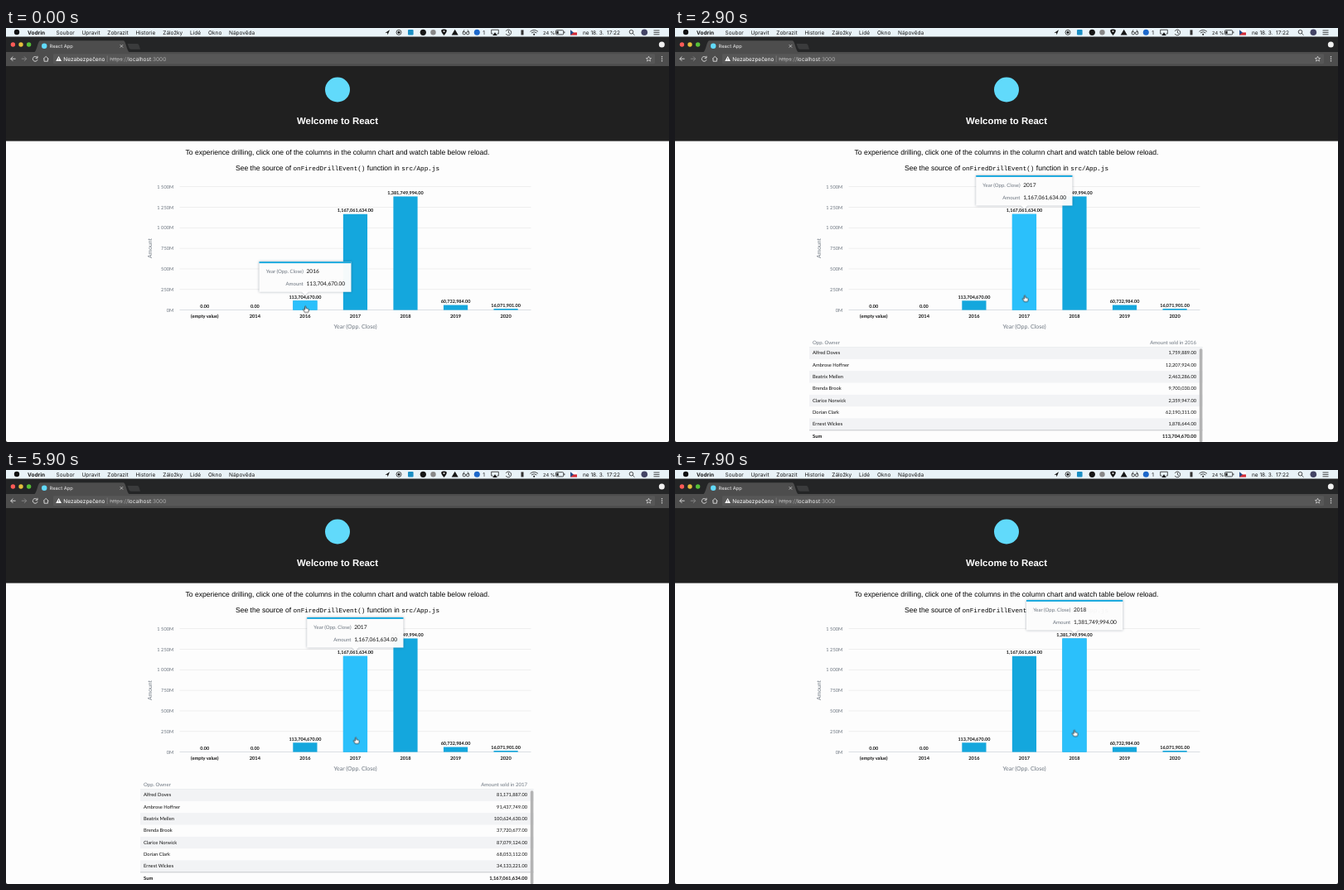
An HTML page for the animation above (8000 ms loop, 800 by 500 pixels).

```html
<!DOCTYPE html>
<html lang="cs">
<head>
<meta charset="utf-8">
<title>React App</title>
<style>
  html, body { margin: 0; width: 100%; height: 100%; overflow: hidden; background: #fdfdfd; }
  svg { display: block; width: 800px; height: 500px; text-rendering: geometricPrecision; }
  text { white-space: pre; }
  .ui { font-family: Inter, sans-serif; font-size: 6.5px; fill: #161616; }
  .page { font-family: "Liberation Sans", Arial, sans-serif; font-size: 8.57px; fill: #000; }
  .code { font-family: "Liberation Mono", "Courier New", monospace; font-size: 7.63px; }
  .chart { font-family: Lato, sans-serif; font-size: 5.7px; fill: #111; }
  .soft { fill: #6d7680; }
  .bold { font-weight: 700; }
  .mid { text-anchor: middle; }
  .end { text-anchor: end; }
  .line { fill: none; stroke: #222; stroke-width: .8; }
  .bar { fill: #14a7dd; }
  .hot { fill: #2bc0fb; }
  .tip { filter: drop-shadow(0 .7px 1.4px rgba(20, 40, 60, .38)); }

  /* 1.25% of the loop is 100 ms */
  .timed { visibility: hidden; animation: 8s step-end infinite; }
  #hot2 { animation-name: hot2; }
  #hot3 { animation-name: hot3; }
  #hot4 { animation-name: hot4; }
  #tip2 { animation-name: tip2; }
  #tip3 { animation-name: tip3; }
  #tip4 { animation-name: tip4; }
  #table2016 { animation-name: table2016; }
  #table2017 { animation-name: table2017; }
  #hand { animation-name: hand; }
  #arrow { animation-name: arrow; }
  #cursor { animation: move 8s step-end infinite; }

  @keyframes hot2 { 0% { visibility: visible } 23.75%, 100% { visibility: hidden } }
  @keyframes hot3 { 0% { visibility: hidden } 26.25% { visibility: visible } 80%, 100% { visibility: hidden } }
  @keyframes hot4 { 0% { visibility: hidden } 82.5%, 100% { visibility: visible } }
  @keyframes tip2 { 0% { visibility: visible } 27.5%, 100% { visibility: hidden } }
  @keyframes tip3 { 0% { visibility: hidden } 27.5% { visibility: visible } 83.75%, 100% { visibility: hidden } }
  @keyframes tip4 { 0% { visibility: hidden } 83.75%, 100% { visibility: visible } }
  @keyframes table2016 { 0% { visibility: hidden } 17.5% { visibility: visible } 41.25%, 100% { visibility: hidden } }
  @keyframes table2017 { 0% { visibility: hidden } 66.25% { visibility: visible } 95%, 100% { visibility: hidden } }
  @keyframes hand {
    0% { visibility: visible } 23.75% { visibility: hidden } 26.25% { visibility: visible }
    80% { visibility: hidden } 81.25%, 100% { visibility: visible }
  }
  @keyframes arrow {
    0% { visibility: hidden } 23.75% { visibility: visible } 26.25% { visibility: hidden }
    80% { visibility: visible } 81.25%, 100% { visibility: hidden }
  }
  @keyframes move {
    0% { transform: translate(362px, 339.5px) }
    21.25% { transform: translate(365px, 339px) }
    22.5% { transform: translate(374px, 338.5px) }
    23.75% { transform: translate(385.5px, 338px) }
    25% { transform: translate(402px, 334px) }
    26.25% { transform: translate(415px, 329px) }
    27.5% { transform: translate(422.7px, 326.5px) }
    78.75% { transform: translate(427px, 326px) }
    80% { transform: translate(447px, 325px) }
    81.25% { transform: translate(468.6px, 323.3px) }
    82.5% { transform: translate(477px, 320px) }
    83.75%, 100% { transform: translate(482.6px, 317.6px) }
  }
</style>
</head>
<body>
<svg viewBox="0 0 800 500">
  <rect width="800" height="500" fill="#fdfdfd"/>

  <g id="menu" class="ui">
    <rect width="800" height="10.7" fill="#e9f3f8"/>
    <circle cx="13" cy="5" r="3.2" fill="#111"/>
    <path d="M457.5 6 463 2.3 460.6 8.2 460 5.8Z"/>
    <circle class="line" cx="474" cy="5.3" r="3"/><circle cx="474" cy="5.3" r="1.5"/>
    <rect x="485" y="2" width="6.6" height="6.6" rx="1" fill="#1b8fc4"/>
    <circle cx="503.3" cy="5.3" r="3.6"/>
    <circle cx="515.5" cy="5.3" r="3.2" fill="#888"/>
    <path d="M528.5 9C522.5 2 526 1.5 528.5 1.5S534.5 2 528.5 9Z"/><circle cx="528.5" cy="4" r="1" fill="#eee"/>
    <path d="M541.7 1.8 545.7 8.6H537.7Z"/>
    <g class="line"><circle cx="552.8" cy="6.2" r="1.7"/><circle cx="557.2" cy="6.2" r="1.7"/><path d="M551.3 5 553 2.3M558.7 5 557 2.3"/></g>
    <circle cx="568.3" cy="5.3" r="3.5" fill="#1c68cb"/>
    <path class="line" d="M587.5 7H585.7V2.2H594.3V7H592.5"/><path d="M590 5.3 592.8 9H587.2Z"/>
    <path class="line" d="M603.2 3.8A3.4 3.4 0 1 1 603.2 7M606.4 3.3V5.7L608 6.6"/>
    <rect x="621.5" y="2.4" width="3" height="6" fill="#333"/>
    <g class="line" stroke-linecap="round"><path d="M632.8 4.1Q637.2 .5 641.6 4.1M634.3 5.7Q637.2 3.4 640.1 5.7"/></g><circle cx="637.2" cy="7.8" r="1"/>
    <rect class="line" x="663.4" y="2.7" width="9.3" height="5.2" rx="1"/><rect x="664.4" y="3.7" width="2.2" height="3.2"/><rect x="673.4" y="4.4" width=".9" height="1.8"/>
    <rect x="681" y="2.2" width="8" height="3.2" fill="#fff"/><rect x="681" y="5.4" width="8" height="3.2" fill="#d52b35"/><path d="M681 2.2 685 5.4 681 8.6Z" fill="#254b87"/>
    <circle class="line" cx="754.5" cy="4.7" r="2.3"/><path class="line" d="M756.2 6.4 758.5 8.7"/>
    <circle cx="770.3" cy="5.3" r="3.8" fill="#434465"/>
    <path class="line" d="M781.5 3H788.5M781.5 5.4H788.5M781.5 7.8H788.5"/>
  </g>

  <g id="browser">
    <rect y="10.5" width="800" height="18.7" fill="#242526"/>
    <circle cx="8.4" cy="20" r="2.7" fill="#fc5b57"/>
    <circle cx="18" cy="20" r="2.7" fill="#e5bf3c"/>
    <circle cx="27.6" cy="20" r="2.7" fill="#57c038"/>
    <path d="M34 29.2C37 28.5 38 17 41 15.2H142C145 17 146 28.5 149 29.2Z" fill="#4d4d4d"/>
    <path d="M146.5 19H158.5Q160 19 160.6 21L162 25.8H151Q149 25.8 148.4 24Z" fill="#3a3b3c"/>
    <circle cx="46.2" cy="21.8" r="3.2" fill="#61dafb"/>
    <path d="M137.7 20.2 141.1 23.6M141.1 20.2 137.7 23.6" stroke="#ccc" stroke-width=".8"/>
    <circle cx="791.3" cy="20" r="3.5" fill="#f0f0f0"/>
    <rect y="29" width="800" height="17.2" fill="#4d4d4d"/>
    <rect x="57" y="31.3" width="726" height="12" rx="1.2" fill="#575757"/>
    <g fill="none" stroke="#dedede" stroke-width=".9">
      <path d="M11.6 37.2H5.8M8.4 34.5 5.7 37.2 8.4 39.9"/>
      <path d="M18.8 37.2H24.6M22 34.5 24.7 37.2 22 39.9" stroke="#8b8b8b"/>
      <path d="M37.6 35.7A2.9 2.9 0 1 0 38 38.2M38 33.8V36.3H35.5"/>
      <path d="M45 37.4 48.2 34.4 51.4 37.4M46 37V40.2H50.4V37"/>
    </g>
    <path d="M63.6 34 67 40H60.2Z" fill="#fff"/><path d="M63.6 36V38M63.6 38.5V39.2" stroke="#555" stroke-width=".7"/>
    <path d="M775.5 34.2 776.4 36.3 778.6 36.5 776.9 37.9 777.5 40.1 775.5 38.9 773.5 40.1 774.1 37.9 772.4 36.5 774.6 36.3Z" fill="none" stroke="#ddd" stroke-width=".7"/>
    <g fill="#ddd"><circle cx="791.5" cy="34.8" r=".8"/><circle cx="791.5" cy="37.3" r=".8"/><circle cx="791.5" cy="39.8" r=".8"/></g>
    <g class="ui">
      <text x="52.5" y="24.1" fill="#eee" style="font-size:5.8px">React App</text>
      <text x="69.3" y="39.7" fill="#fff">Nezabezpečeno</text>
      <path d="M122.2 33.5V41" stroke="#888" stroke-width=".6"/>
      <text x="125.2" y="39.7" fill="#aaa"><tspan text-decoration="line-through">https</tspan>://<tspan fill="#eee">localhost</tspan>:3000</text>
    </g>
  </g>

  <g class="page mid">
    <rect y="46" width="800" height="90.6" fill="#202020"/>
    <circle cx="400" cy="74.5" r="15" fill="#61dafb"/>
    <text class="bold" x="400" y="115.8" fill="#fff" style="font-size:11.4px">Welcome to React</text>
    <text x="400" y="153.2">To experience drilling, click one of the columns in the column chart and watch table below reload.</text>
    <text x="400" y="172">See the source of <tspan class="code">onFiredDrillEvent()</tspan> function in <tspan class="code">src/App.js</tspan></text>
  </g>

  <g id="chart" class="chart"></g>
  <g id="tables" class="chart"></g>
  <g id="tips" class="chart"></g>

  <g id="cursor">
    <path id="hand" class="timed" fill="#fff" stroke="#111" stroke-width=".65" stroke-linejoin="round"
      d="M-1.4 4 -3.4 .8Q-3.6-.4-2.4 0L-1.4 1V-3.2Q-.8-4.2-.1-3.2V-.8Q.7-1.3 1.2-.5 2-.9 2.4-.1 3.3-.3 3.4.6V2.2L2.6 4Z"/>
    <path id="arrow" class="timed" stroke="#fff" stroke-width=".5"
      d="M-1.2-3.8V3.1L.3 1.7 1.3 4 2.5 3.5 1.5 1.3H3.6Z"/>
  </g>
  <path d="M0 498Q0 500 2 500H0ZM800 498Q800 500 798 500H800Z" fill="#222"/>
</svg>
<script>
  const years = ['(empty value)', '2014', '2016', '2017', '2018', '2019', '2020'];
  const amounts = [0, 0, 113704670, 1167061634, 1381749994, 60732984, 16071901];
  const owners = ['Alfred Doves', 'Ambrose Hoffner', 'Beatrix Mellen', 'Brenda Brook',
    'Clarice Norwick', 'Dorian Clark', 'Ernest Wickes'];
  const sales = {
    2016: [1759889, 12207924, 2463286, 9700030, 2359947, 62190311, 1878644],
    2017: [81171887, 91437749, 100624630, 37720677, 87079124, 68053112, 34133221]
  };
  const base = 340.6, unit = 148.9 / 1.5e9;

  const put = (id, markup) => document.getElementById(id).insertAdjacentHTML('beforeend', markup);
  const money = n => n.toLocaleString('en-US', { minimumFractionDigits: 2 });
  const text = (x, y, s, cls = '', size = 5.7) =>
    `<text x="${x}" y="${y}" class="${cls}" style="font-size:${size}px">${s}</text>`;
  const rect = (x, y, w, h, extra) => `<rect x="${x}" y="${y}" width="${w}" height="${h}" ${extra}/>`;
  const center = i => 239.8 + 60.55 * i;

  [[26, 'Vodrin', 'bold'], [60.5, 'Soubor'], [91.5, 'Upravit'], [122.3, 'Zobrazit'], [156.5, 'Historie'],
    [189.3, 'Záložky'], [222, 'Lidé'], [244, 'Okno'], [269, 'Nápověda'], [575.3, '1'],
    [696, 'ne 18. 3.  17:22']].forEach(([x, s, cls]) => put('menu', text(x, 7.6, s, cls, 6.5)));
  put('menu', text(648, 7.5, '24 %', '', 5.7));

  for (let i = 0; i <= 6; i++) {
    const y = base - i * 24.82;
    const label = (i * 250).toString().replace(/^1(?=\d{3})/, '1 ') + 'M';
    put('chart', rect(209.5, y - .4, 424, .8, `fill="${i ? '#ebebeb' : '#d3d8de'}"`) +
      text(202.3, y + 2, label, 'end soft'));
  }
  years.forEach((year, i) => {
    const x = center(i), h = amounts[i] * unit, top = base - h;
    const box = extra => rect(x - 14.6, top, 29.2, h, extra);
    put('chart', box('class="bar"') +
      (i > 1 && i < 5 ? box(`id="hot${i}" class="hot timed"`) : '') +
      text(x, top - 2.3, money(amounts[i]), 'mid bold', 5.5) +
      text(x, 349.6, year, 'mid bold', 5.7));
  });
  put('chart', text(421.5, 362.6, 'Year (Opp. Close)', 'mid soft', 7) +
    `<g transform="translate(176 266) rotate(-90)">${text(0, 0, 'Amount', 'mid soft', 6.8)}</g>`);

  [[2, 305.5, 282.2, 111], [3, 363.2, 178, 116.3], [4, 424, 157, 116.3]].forEach(([i, x, y, w]) => {
    const mid = center(i), foot = y + 36.6;
    put('tips', `<g id="tip${i}" class="tip timed">
      <path d="M${x} ${y}H${x + w}V${foot}H${mid + 4}L${mid} ${foot + 3.6} ${mid - 4} ${foot}H${x}Z" fill="#fff" fill-opacity=".96"/>
      ${rect(x, y, w, 1.9, 'class="bar"')}
      ${text(x + 53.3, y + 14.2, 'Year (Opp. Close)', 'end soft', 6.05)}
      ${text(x + 57, y + 14.2, years[i], '', 6.6)}
      ${text(x + 53.3, y + 28.5, 'Amount', 'end soft', 6.05)}
      ${text(x + 57, y + 28.5, money(amounts[i]), '', 6.6)}</g>`);
  });

  for (const year in sales) {
    const rows = owners.map((owner, i) => {
      const y = 385.6 + i * 14.3;
      return (i % 2 ? '' : rect(162, y, 474.5, 14.3, 'fill="#f2f3f5"')) +
        text(166, y + 8.7, owner, '', 5.8) + text(629, y + 8.7, money(sales[year][i]), 'end');
    }).join('');
    const total = amounts[years.indexOf(year)];
    put('tables', `<g id="table${year}" class="timed">
      ${text(166, 382.3, 'Opp. Owner', 'soft', 6.05)}
      ${text(629, 382.3, 'Amount sold in ' + year, 'end soft', 6.05)}
      ${rect(162, 385.1, 474.5, .7, 'fill="#dfe2e6"')}${rows}
      ${rect(162, 485.5, 474.5, 14.5, 'fill="#fdfdfd"')}${rect(162, 485.3, 474.5, 1, 'fill="#c4c7ca"')}
      ${text(166, 495.2, 'Sum', 'bold', 5.8)}${text(629, 495.2, money(total), 'end bold', 5.8)}
      ${rect(632.8, 387.3, 3.6, 113, 'rx="1.8" fill="#b4b4b4"')}</g>`);
  }
</script>
</body>
</html>
```
